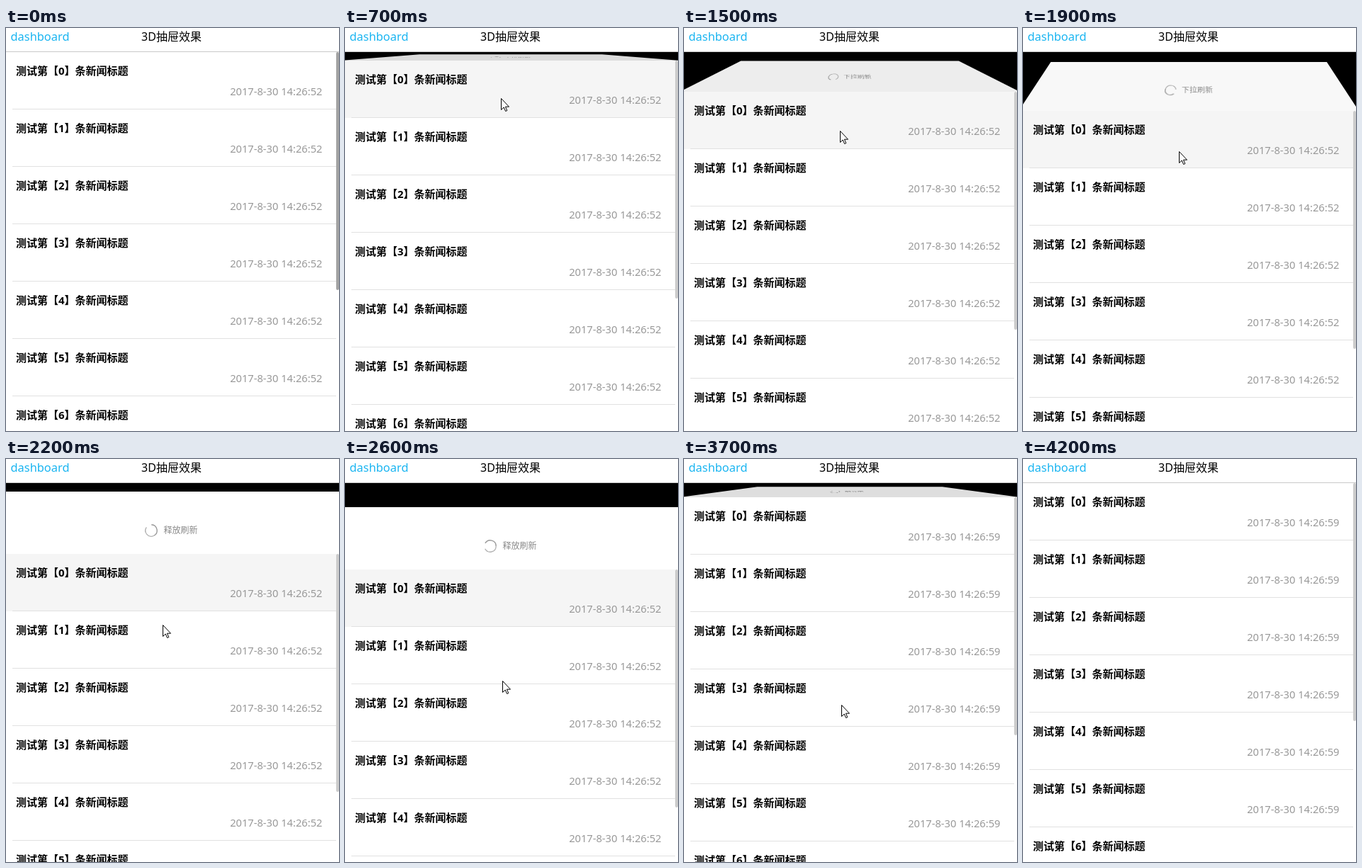
Write an HTML page that moves like this. It is 470 px wide and 569 px high and loops after 5000 ms.

```html
<!DOCTYPE html>
<html lang="zh-CN">
<head>
<meta charset="utf-8">
<title>3D抽屉效果</title>
<style>
  html, body { margin: 0; width: 100%; height: 100%; overflow: hidden; background: #fff; }
  body { position: relative; font: 15px/20px "Noto Sans", "Noto Sans CJK SC", "Noto Sans CJK", sans-serif; color: #000; }
  header { position: absolute; width: 470px; height: 33px; border-bottom: 1px solid #c8c8c8; background: #fff; font-size: 16px; }
  header span { position: absolute; top: 2px; white-space: nowrap; }
  .back { left: 6.5px; font-size: 16.4px; color: #1ab5f1; }
  .heading { left: 0; width: 467px; text-align: center; }
  #viewport { position: absolute; top: 34px; width: 470px; height: 535px; overflow: hidden; background: #000; }
  #panel { position: absolute; width: 470px; height: 569px; }
  #drawer { position: absolute; left: -6.5px; top: -88px; width: 480px; height: 88px; transform-origin: 50% 100%;
    display: flex; justify-content: center; gap: 8px; font-size: 12px; color: #888; }
  #spinner { width: 18px; height: 18px; margin-top: 46px; }
  #hint { margin-top: 45px; white-space: nowrap; }
  #list { position: absolute; width: 470px; height: 569px; background: #fff; }
  .row { position: relative; width: 466px; height: 81px; }
  .row::after { content: ""; position: absolute; left: 9px; right: 0; bottom: 0; height: 1px; background: #e1e1e1; }
  .row b, .row time { position: absolute; white-space: nowrap; }
  .row b { left: 14px; top: 16px; }
  .row time { right: 19.5px; top: 45px; font-size: 14.7px; color: #999; }
  .pressed { background: #f5f5f5; }
  #scrollbar { position: absolute; left: 466px; top: 0; width: 4px; height: 336px; border-radius: 2px; background: #000; }
  #cursor { position: absolute; left: 0; top: 0; width: 13px; height: 20px; }
</style>
</head>
<body>
<header><span class="back">dashboard</span><span class="heading">3D抽屉效果</span></header>
<div id="viewport">
  <div id="panel">
    <div id="drawer">
      <svg id="spinner" viewBox="-9 -9 18 18" fill="none" stroke="#999" stroke-width="1.4">
        <path d="M7.2 3.9A8.2 8.2 0 0 1 -8.2 0"/>
        <path d="M-8.2 0A8.2 8.2 0 0 1 7.2 -3.9" opacity=".75"/>
      </svg>
      <span id="hint"></span>
    </div>
    <div id="list"></div>
    <div id="scrollbar"></div>
  </div>
</div>
<svg id="cursor" viewBox="0 0 13 20"><path d="M.5.5v16l3.7-3.5 2.4 5.5 2.2-.9-2.4-5.4h5.1z" fill="#fff" stroke="#000"/></svg>
<script>
const LOOP = 5000, STEP = 100;
const RELEASE = 2980, COLLAPSE = 3460, SETTLE = 600;
const OPEN = 100, MAX_PULL = 130;
const $ = id => document.getElementById(id);
const panel = $("panel"), drawer = $("drawer"), hint = $("hint"), spinner = $("spinner"),
  list = $("list"), scrollbar = $("scrollbar"), cursor = $("cursor");

list.innerHTML = Array.from({ length: 7 }, (_, i) =>
  `<div class="row"><b>测试第【${i}】条新闻标题</b><time></time></div>`).join("");
const stamps = [...list.querySelectorAll("time")];

// Linear interpolation through [time, value] pairs.
function track(t, keys) {
  const i = keys.findIndex(key => key[0] > t);
  if (i < 0) return keys[keys.length - 1][1];
  if (i === 0) return keys[0][1];
  const [t0, v0] = keys[i - 1], [t1, v1] = keys[i];
  return v0 + (v1 - v0) * (t - t0) / (t1 - t0);
}

// Circular ease-out from one pull distance to another.
function settle(t, start, from, to) {
  const k = Math.min(1, (t - start) / SETTLE);
  return from + (to - from) * Math.sqrt(1 - (k - 1) ** 2);
}

function pullAt(t) {
  if (t >= COLLAPSE) return settle(t, COLLAPSE, OPEN, 0);
  if (t >= RELEASE) return settle(t, RELEASE, MAX_PULL, OPEN);
  return track(t, [[400, 0], [1100, 28], [1900, 83], [2600, 122], [2800, MAX_PULL]]);
}

function draw(t) {
  const pull = Math.round(pullAt(t));
  const closed = Math.max(0, 1 - pull / OPEN);
  const shade = Math.round(255 - 41 * closed);

  panel.style.transform = `translateY(${pull}px)`;
  drawer.style.transform = closed ? `perspective(100px) rotateX(${90 * closed}deg)` : "none";
  drawer.style.background = `rgb(${shade},${shade},${shade})`;
  hint.textContent = t >= RELEASE ? "加载中..." : closed ? "下拉刷新" : "释放刷新";
  spinner.style.transform = `rotate(${20 + (t - 1900) * 0.745}deg)`;

  list.firstChild.classList.toggle("pressed", t >= 500 && t < RELEASE);
  const stamp = `2017-8-30 14:26:${t < COLLAPSE ? 52 : 59}`;
  for (const el of stamps) el.textContent = stamp;
  scrollbar.style.opacity = track(t, [[0, 0.36], [300, 0.2]]);

  const x = track(t, [[100, 300], [300, 220], [1900, 220], [2600, 222], [3800, 222], [4100, 338]]);
  const y = track(t, [[100, 180], [300, 87], [400, 87], [1100, 115], [1900, 174],
    [2600, 313], [2800, 346], [3800, 347], [4100, 241]]);
  cursor.style.transform = `translate(${Math.round(x)}px,${Math.round(y)}px)`;
  cursor.style.visibility = t >= 100 && t < 4200 ? "visible" : "hidden";
}

const begin = performance.now();
function tick() {
  const t = (performance.now() - begin) % LOOP;
  draw(Math.floor(t / STEP) * STEP);
  requestAnimationFrame(tick);
}
tick();
</script>
</body>
</html>
```
